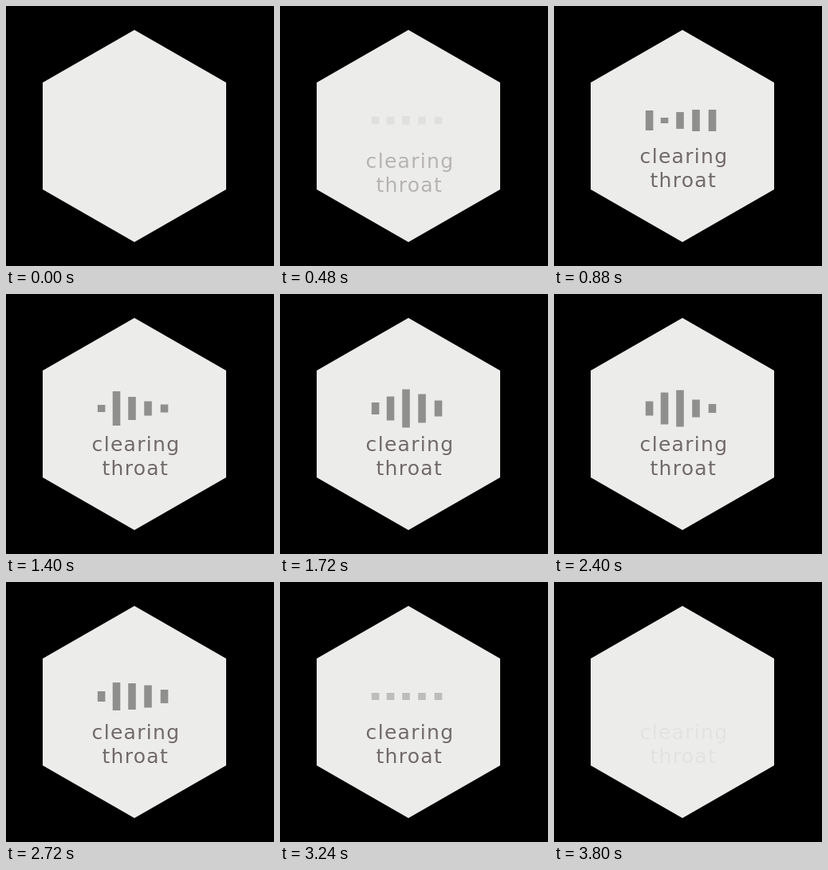
Write an HTML page that moves like this. It is 336 px wide and 326 px high and loops after 4.04 s.

```html
<!DOCTYPE html>
<html lang="en">
<head>
<meta charset="utf-8">
<title>Clearing throat</title>
<style>
  html, body { margin: 0; width: 100%; height: 100%; overflow: hidden; background: #000; }
  svg { display: block; width: 336px; height: 326px; }

  .label {
    font: 25px "DejaVu Sans", sans-serif;
    letter-spacing: 1.3px;
    fill: #716a69;
    animation: label 4040ms linear infinite;
  }
  .bars { fill: #8f8f8e; animation: bars 4040ms linear infinite; }
  .bars rect {
    transform-box: fill-box;
    transform-origin: center;
    animation: level 4040ms ease-in-out infinite;
  }

  /* Rise and fade in, then fade out in coarse steps */
  @keyframes label {
    0% { opacity: 0; transform: translateY(11px); }
    8.6% { opacity: 0; transform: translateY(11px); animation-timing-function: ease-out; }
    19.8% { opacity: 1; transform: none; }
    80.19% { opacity: 1; transform: none; animation-timing-function: steps(7, end); }
    94.05%, 100% { opacity: .07; transform: none; }
  }
  @keyframes bars {
    0%, 10.89% { opacity: 0; }
    18.8% { opacity: 1; }
    76.23% { opacity: 1; animation-timing-function: steps(4, end); }
    84.15%, 100% { opacity: 0; }
  }

  /* Bar heights in px, over a resting height of 9 */
  @keyframes level {
    0%, 10.89% { transform: scaleY(1); }
    16.34% { transform: scaleY(calc(var(--a) / 9)); }
    21.78% { transform: scaleY(calc(var(--b) / 9)); }
    28.22% { transform: scaleY(calc(var(--c) / 9)); }
    34.65% { transform: scaleY(calc(var(--d) / 9)); }
    42.57% { transform: scaleY(calc(var(--e) / 9)); }
    50.5% { transform: scaleY(calc(var(--f) / 9)); }
    58.91% { transform: scaleY(calc(var(--g) / 9)); }
    67.33% { transform: scaleY(calc(var(--h) / 9)); }
    77.23%, 100% { transform: scaleY(1); }
  }
  .b1 { --a: 17; --b: 25; --c: 13; --d: 9; --e: 15; --f: 11; --g: 18; --h: 13; }
  .b2 { --a: 22; --b: 7; --c: 24; --d: 43; --e: 30; --f: 23; --g: 40; --h: 35; }
  .b3 { --a: 33; --b: 21; --c: 43; --d: 29; --e: 48; --f: 43; --g: 46; --h: 33; }
  .b4 { --a: 18; --b: 27; --c: 22; --d: 18; --e: 36; --f: 28; --g: 22; --h: 28; }
  .b5 { --a: 12; --b: 27; --c: 14; --d: 10; --e: 20; --f: 13; --g: 11; --h: 17; }
</style>
</head>
<body>
<svg viewBox="0 0 336 326">
  <path fill="#ececeb" d="M161 30 276 96V230L161 296 46 230V96Z"/>
  <g class="bars">
    <rect class="b1" x="114.8" y="139" width="9.6" height="9"/>
    <rect class="b2" x="133.7" y="139" width="9.6" height="9"/>
    <rect class="b3" x="153.2" y="139" width="9.6" height="9"/>
    <rect class="b4" x="173.2" y="139" width="9.6" height="9"/>
    <rect class="b5" x="193.7" y="139" width="9.6" height="9"/>
  </g>
  <g class="label">
    <text x="107.6" y="197">clearing</text>
    <text x="120.5" y="227">throat</text>
  </g>
</svg>
</body>
</html>
```
